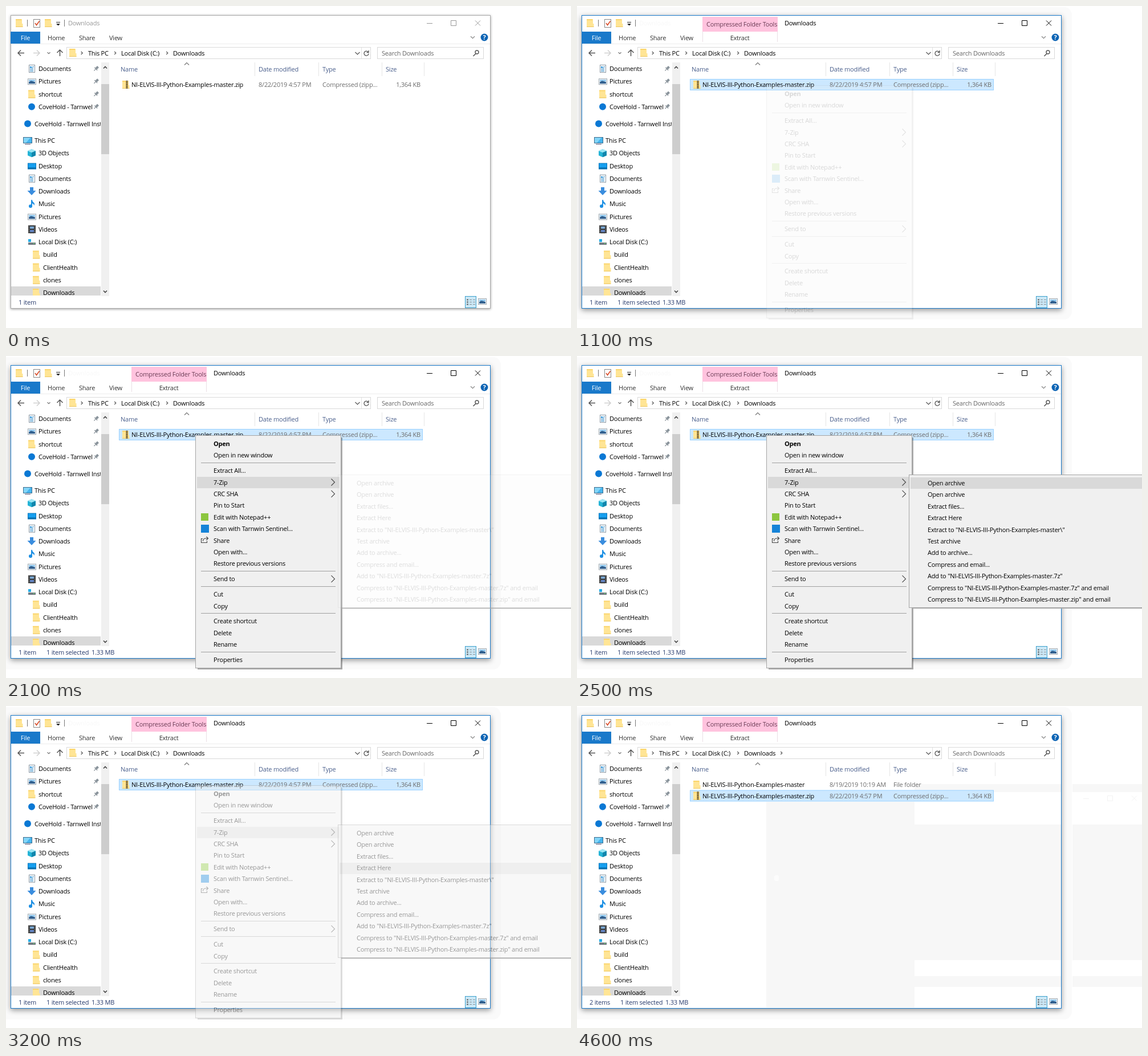
Animation, 991 px wide and 565 px high, one loop 5800 ms. Source, as an HTML page:

```html
<!DOCTYPE html>
<html lang="en">
<head>
<meta charset="utf-8">
<title>Extracting an archive</title>
<style>
html, body { margin: 0; width: 100%; height: 100%; overflow: hidden; background: #fff; }
svg { display: block; width: 991px; height: 565px; }
text { font: 11px "Open Sans", "Noto Sans", sans-serif; letter-spacing: -.22px; white-space: pre; }
</style>
</head>
<body>
<svg id="stage" viewBox="0 0 991 565"></svg>
<script>
const LOOP = 5800;
const ARCHIVE = 'NI-ELVIS-III-Python-Examples-master';
const BLUE = '#1979ca';

// Text is placed by its left edge and the middle of its capitals.
const text = (x, y, s, fill = '#000', more = '') =>
  `<text x="${x}" y="${y + 4}" fill="${fill}" ${more}>${s}</text>`;
const rect = (x, y, w, h, fill, more = '') =>
  `<rect x="${x}" y="${y}" width="${w}" height="${h}" fill="${fill}" ${more}/>`;
const box = (x, y, w, h, fill, stroke, more = '') =>
  rect(x + .5, y + .5, w - 1, h - 1, fill, `stroke="${stroke}" ${more}`);
const line = (d, stroke = '#555', width = 1) =>
  `<path d="${d}" fill="none" stroke="${stroke}" stroke-width="${width}"/>`;
const shape = (d, fill) => `<path d="${d}" fill="${fill}"/>`;
const disc = (x, y, r, fill) => `<circle cx="${x}" cy="${y}" r="${r}" fill="${fill}"/>`;
const group = (opacity, ...parts) =>
  opacity > 0 ? `<g opacity="${opacity}">${parts.join('')}</g>` : '';
const right = (x, y, r = 2.5, color = '#555', w = 1.2) =>
  line(`M${x - r / 2} ${y - r}l${r} ${r}l${-r} ${r}`, color, w);
const vertical = (x, y, r, dir, color = '#555', w = 1.2) =>
  line(`M${x - r} ${y - dir * r / 2}l${r} ${dir * r}l${r} ${-dir * r}`, color, w);

// Icons are centred on x, y.
const icon = {
  folder: (x, y) => rect(x - 6, y - 7, 11, 14, '#fbd56b') +
    shape(`M${x - 6} ${y - 5}h10v-2h1v8h1.500v6h-12.500z`, '#ffe595') +
    line(`M${x - 6} ${y + 6.5}h12.500`, '#eec75f'),
  zip: (x, y) => icon.folder(x, y) + rect(x, y - 7, 4, 14, '#c9a64b') +
    line(`M${x + 2} ${y - 7}v14`, '#444', '2.500" stroke-dasharray="1.500 1.500'),
  document: (x, y) => box(x - 5, y - 7, 11, 14, '#fff', '#8997a3') +
    rect(x - 3, y - 4, 3, 3, '#3a9bdc') +
    line(`M${x + 1} ${y - 3.5}h3m-4 2h3m-6 2h6m-6 2h6m-6 2h6`, '#4b9bd0'),
  picture: (x, y) => box(x - 7, y - 5, 15, 11, '#fff', '#9aa5ad') +
    rect(x - 5, y - 3, 11, 3, '#8ec8ef') +
    shape(`M${x - 5} ${y + 4}v-3l4-2 7 2v3z`, '#305f8e'),
  cloud: (x, y) => disc(x, y, 6, '#0a78d4'),
  pc: (x, y) => box(x - 8, y - 6, 16, 11, '#45b4ee', '#3b6e8f') +
    shape(`M${x - 7} ${y - 5}h12l-8 9h-4z`, '#83d5f8') + rect(x - 5, y + 6, 10, 1, '#557'),
  cube: (x, y) => shape(`M${x - 7} ${y - 4}l7-3 7 3v8l-7 3-7-3z`, '#25b4d6') +
    shape(`M${x - 7} ${y - 4}l7-3 7 3-7 3z`, '#9be6f4') +
    shape(`M${x} ${y - 1}l7-3v8l-7 3z`, '#1287ad'),
  desktop: (x, y) => box(x - 7, y - 5, 15, 11, '#159ff0', '#0876b9') +
    rect(x - 6, y + 3, 13, 2, '#07659f'),
  download: (x, y) => shape(`M${x - 3} ${y - 7}h6v6h4.500l-7.500 8-7.500-8h4.500z`, '#3a8dde'),
  music: (x, y) => disc(x - 2, y + 4, 3, '#1c8fe3') +
    shape(`M${x - 1} ${y - 7}h2q0 3 3 5 2 2 0 5 0-3-3-4v6h-2z`, '#1c8fe3'),
  video: (x, y) => rect(x - 6, y - 7, 13, 14, '#333') + rect(x - 3, y - 5, 7, 4, '#7ba9d5') +
    rect(x - 3, y + 1, 7, 4, '#6485c4') +
    line(`M${x - 4.5} ${y - 6}v13m10 -13v13`, '#ddd', '1" stroke-dasharray="1 2'),
  disk: (x, y) => rect(x - 6, y - 5, 5, 5, '#25aee8') + rect(x - 6, y + 1, 13, 4, '#727b82') +
    rect(x + 3, y + 2, 2, 1, '#6f6'),
};

const pin = y => `<g transform="translate(158 ${y}) rotate(45)">` +
  rect(-2, -5, 4, 5, '#8a949c') + rect(-3.5, 0, 7, 1, '#717c85') + rect(-.5, 1, 1, 4, '#717c85') + '</g>';

function navigation() {
  const pinned = [['document', 'Documents'], ['picture', 'Pictures'], ['folder', 'shortcut'],
    ['cloud', 'CoveHold - Tarnwel']];
  const places = [['cube', '3D Objects'], ['desktop', 'Desktop'], ['document', 'Documents'],
    ['download', 'Downloads'], ['music', 'Music'], ['picture', 'Pictures'], ['video', 'Videos'],
    ['disk', 'Local Disk (C:)']];
  const folders = ['build', 'ClientHealth', 'clones', 'Downloads'];
  const item = (kind, label, x, y) => icon[kind](x - 12, y) + text(x, y, label);
  const step = 22.25;
  return '<clipPath id="nav"><path d="M9 99h157v409H9z"/></clipPath><g clip-path="url(#nav)">' +
    rect(9, 492, 157, 17, '#d9d9d9') +
    pinned.map(([k, s], i) => item(k, s, 57, 110 + i * step) + pin(110 + i * step)).join('') +
    item('cloud', 'CoveHold - Tarnwell Inst', 50, 206.5) + item('pc', 'This PC', 50, 236) +
    places.map(([k, s], i) => item(k, s, 57, 258.3 + i * step)).join('') +
    folders.map((s, i) => item('folder', s, 65, 436.3 + i * step)).join('') + '</g>' +
    rect(167, 99, 14, 410, '#f0f0f0') + rect(167, 137, 14, 123, '#cdcdcd') +
    vertical(174, 108, 3, -1, '#444', 1.6) + vertical(174, 501, 3, 1, '#444', 1.6);
}

const toolbar = () => icon.folder(23, 30) + icon.folder(74, 30) +
  line('M37.500 24v12M102.500 24v12', '#777') +
  box(48, 23, 12, 15, '#fff', '#888') + line('M51 30l2.500 3.500 5-7', '#d9502e', 1.7) +
  line('M88 28.500h7', '#222') + shape('M88 31h7l-3.500 3.500z', '#222') +
  rect(8, 45, 52, 21, BLUE) + text(34, 55.5, 'File', '#fff', 'text-anchor="middle"') +
  text(73, 55.5, 'Home', '#333') + text(128, 55.5, 'Share', '#333') + text(181, 55.5, 'View', '#333') +
  vertical(818.5, 55, 3.5, 1, '#888') + disc(839, 55, 6.5, '#0d64b4') +
  text(839, 55, '?', '#fff', 'text-anchor="middle" font-weight="700" style="font-weight:700"') +
  line('M9 66.500h840', '#ececec');

const addressBar = () => line('M32 82.500h-11m5-5l-5 5 5 5', '#555', 1.5) +
  line('M48 82.500h11m-5-5l5 5-5 5', '#d0d0d0', 1.5) + vertical(75, 82.5, 2.5, 1, '#777') +
  line('M94.500 88v-11m-5 5l5-5 5 5', '#555', 1.5) +
  box(106, 72, 534, 21, '#fff', '#d9d9d9') + line('M623.500 73v19', '#e2e2e2') +
  icon.folder(117, 82) +
  [133, 191.5, 282.5].map(x => right(x, 82.5)).join('') +
  text(144, 82.5, 'This PC') + text(202, 82.5, 'Local Disk (C:)') + text(293, 82.5, 'Downloads') +
  vertical(616.5, 83, 4, 1) + line('M635 80.500a4 4 0 1 0 1 3M636 78v3.500h-3.500', '#555', 1.3) +
  box(651, 72, 187, 21, '#fff', '#d9d9d9') + text(659, 82.5, 'Search Downloads', '#666') +
  '<circle cx="826" cy="81" r="3" fill="none" stroke="#555" stroke-width="1.400"/>' +
  line('M824 83.500l-4.500 4.500', '#555', 1.6);

const listHeader = () => vertical(317, 101.5, 4, -1, '#777') +
  [['Name', 201], ['Date modified', 443], ['Type', 555], ['Size', 666]]
    .map(([s, x]) => text(x, 111, s, '#4a5f8c')).join('') +
  [436.5, 548.5, 659.5, 733.5].map(x => line(`M${x} 99v24`, '#e5e5e5')).join('');

const viewButtons = () => box(805, 509, 20, 21, '#cbe8f6', '#3c9fcb') +
  line('M808 515.500h3m-3 4h3m-3 4h3', '#666', 2) +
  line('M813 515.500h4m2 0h4m-10 4h4m2 0h4m-10 4h4m2 0h4', '#8a8f94') + icon.picture(835, 518);

const chrome = toolbar() + addressBar() + navigation() + listHeader() + viewButtons();

const captionButtons = (x, y, color) =>
  line(`M${x - 5} ${y + .5}h10M${x + 37.5} ${y - 4.5}h9v9h-9zM${x + 80} ${y - 4.5}l9 9m0-9l-9 9`, color);

const frame = active => (active
    ? rect(-14, 2, 882, 548, '#fafafa', 'rx="14"') +
      box(8, 16, 842, 515, '#fff', BLUE, 'style="filter:drop-shadow(0 3px 5px #0006)"')
    : box(8, 16, 842, 515, '#fff', '#aaa', 'style="filter:drop-shadow(0 1px 2px #0006)"')) +
  text(109, 30, 'Downloads', active ? '#f8f8f8' : '#999') +
  captionButtons(743, 30, active ? '#000' : '#999');

const extractTab = active => rect(220, 19, 132, 26, '#ffc3de') +
  text(227, 32, 'Compressed Folder Tools', '#6b3d56') + text(285.5, 55.5, 'Extract', '#333', 'text-anchor="middle"') +
  line('M220.500 45v18M351.500 45v18', '#eadfe5') + text(364, 30, 'Downloads', active ? '#000' : '#999');

const row = (y, kind, name, date, type, size = '') => icon[kind](210, y) + text(220, y, name) +
  text(443, y, date, '#6d6d6d') + text(555, y, type, '#6d6d6d') +
  text(727, y, size, '#6d6d6d', 'text-anchor="end"');
const zipRow = y => row(y, 'zip', ARCHIVE + '.zip', '8/22/2019 4:57 PM', 'Compressed (zipp...', '1,364 KB');
const folderRow = y => row(y, 'folder', ARCHIVE, '8/19/2019 10:19 AM', 'File folder');

const menuPanel = (x, y, w, h) => box(x, y, w, h, '#f0f0f0', '#a5a5a5');
const menuShadow = (x, y, w, h) => rect(x + 4, y + 4, w - 2, h - 2, '#0005');

// An empty label is a separator.
const MENU = ['Open', 'Open in new window', '', 'Extract All...', '7-Zip', 'CRC SHA', 'Pin to Start',
  'Edit with Notepad++', 'Scan with Tarnwin Sentinel...', 'Share', 'Open with...',
  'Restore previous versions', '', 'Send to', '', 'Cut', 'Copy', '', 'Create shortcut', 'Delete',
  'Rename', '', 'Properties'];

function contextMenu(selected) {
  let y = 153.8, out = menuShadow(332, 139, 256, 409) + menuPanel(332, 139, 256, 409);
  for (const label of MENU) {
    if (!label) {
      out += line(`M342 ${Math.floor(y - 7) + .5}h236`, '#a0a0a0');
      y += 6.5;
      continue;
    }
    if (label === selected) out += rect(335, Math.round(y - 10), 250, 20, '#d9d9d9');
    out += text(364, y, label, '#000', label === 'Open' ? 'style="font-weight:700"' : '');
    if (['7-Zip', 'CRC SHA', 'Send to'].includes(label)) out += right(573.5, y, 6, '#444', 1.1);
    y += 20.4;
  }
  return out + rect(342, 276, 13, 13, '#8cc63f') + rect(342, 296, 14, 14, '#1683d8') +
    line('M345 320.500h-2.500v7h10v-3M345.500 325q0-5 5-5h4m-3-3l3 3-3 3', '#444', 1.1);
}

const SUBMENU = ['Open archive', 'Open archive', 'Extract files...', 'Extract Here',
  `Extract to "${ARCHIVE}\\"`, 'Test archive', 'Add to archive...', 'Compress and email...',
  `Add to "${ARCHIVE}.7z"`, `Compress to "${ARCHIVE}.7z" and email`,
  `Compress to "${ARCHIVE}.zip" and email`];

const subMenu = (selected, opacity) =>
  (opacity > 0 ? line('M588 442.500h403', '#aaa', 1.5) : '') +
  group(opacity, menuPanel(582, 208, 430, 234),
    selected >= 0 ? rect(585, Math.round(213.3 + selected * 20.4), 420, 20, '#d9d9d9') : '',
    ...SUBMENU.map((s, i) => text(615, 223 + i * 20.4, s)));

// Faint marks left behind by the closed menus and the progress window.
const traceOutside = () => rect(869, 137, 122, 14, '#f7f7f7') + rect(869, 208, 122, 238, '#f7f7f7') +
  rect(869, 474, 122, 19, '#f7f7f7') + captionButtons(893, 162, '#f3f3f3');
const traceInside = () => rect(332, 137, 260, 392, '#f7f7f7') + rect(592, 137, 257, 14, '#f7f7f7') +
  rect(592, 208, 257, 238, '#f7f7f7') + rect(592, 474, 257, 19, '#f7f7f7') +
  rect(346, 297, 8, 10, '#fcfcfc', 'rx="3"');
const progressWindow = () =>
  box(592, 151, 405, 323, '#fff', '#bbb', 'style="filter:drop-shadow(0 2px 6px #0005)"') +
  captionButtons(893, 162, '#999');

// Value of the last [time, value] pair that has been reached.
const at = (t, ...keys) => keys.reduce((value, [time, next]) => t >= time ? next : value, keys[0][1]);

function scene(t) {
  const selected = t >= 1000, extracted = t >= 4200, sorted = t >= 4600;
  const active = selected && !(t >= 3300 && t < 3400);
  const trace = t >= 3300;
  const menuOpacity = at(t, [0, 0], [1100, .15], [1200, .55], [1300, 1], [3200, .4], [3300, 0]);
  const subOpacity = at(t, [0, 0], [2100, .13], [2200, .55], [2300, 1], [3200, .4], [3300, 0]);
  const menuItem = at(t, [0, ''], [1400, 'Open in new window'], [1500, 'Extract All...'], [1800, '7-Zip']);
  const subItem = at(t, [0, -1], [2500, 0], [2600, 1], [2700, 2], [2900, 3]);
  const zipY = sorted ? 157.5 : 138;
  const statusX = extracted ? 5 : 0;

  let out = frame(active);
  if (trace) out += traceOutside() + traceInside();
  if (selected) out += extractTab(active);
  out += chrome;
  if (t >= 4400) out += right(358.5, 82.5);

  if (extracted) out += rect(198, 128, 394, 40, '#fff');
  if (selected) out += box(198, zipY - 10, 533, 20, '#cce8ff', '#99d1ff');
  else if (t >= 800) out += rect(198, 128, 533, 20, '#e5f3ff');
  out += zipRow(zipY);
  if (extracted) out += folderRow(sorted ? 138 : 157.5);

  out += text(22, 519.5, extracted ? '2 items' : '1 item', '#26396b');
  if (selected) out += text(71 + statusX, 519.5, '1 item selected', '#26396b') +
    text(150 + statusX, 519.5, '1.33 MB', '#26396b');

  return out + group(menuOpacity, contextMenu(menuItem)) + subMenu(subItem, subOpacity) +
    group(at(t, [0, 0], [3300, .5], [3400, .2], [3500, 0]), progressWindow());
}

const stage = document.getElementById('stage');
let shown = -1;
function draw(now) {
  const step = Math.floor((now % LOOP) / 100) * 100;
  if (step !== shown) {
    stage.innerHTML = scene(step);
    shown = step;
  }
  requestAnimationFrame(draw);
}
draw(0);
</script>
</body>
</html>
```
